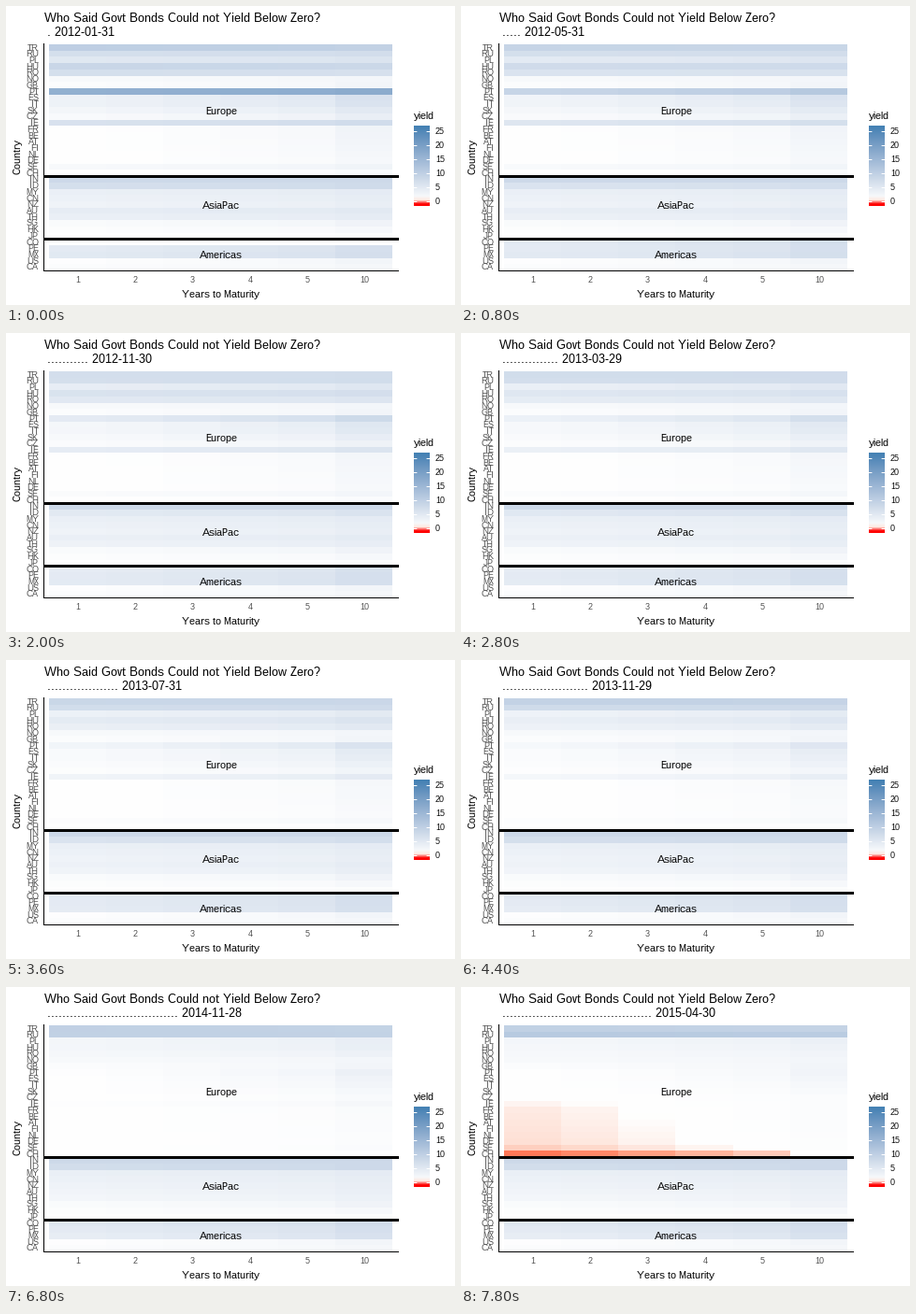
Write a matplotlib script that moves like this. It is 480x320 px and loops after 8000 ms.

```python
import numpy as np
import matplotlib.pyplot as plt
from matplotlib.animation import FuncAnimation

W, H, DPI = 480, 320, 80
MONTHS = 40
PX = 72 / DPI                      # points per pixel
LOW, HIGH = -1.7, 27.0             # limits of the colour scale

plt.rcParams.update({
    "font.family": "Liberation Sans",
    "text.hinting": "native",
    "text.hinting_factor": 1,
    "text.kerning_factor": 6,
})

EUROPE = "TR RU PL HU RO NO GB PT ES IT SK CZ IE FR BE AT FI NL DE SE CH".split()
ASIAPAC = "IN ID MY CN NZ AU TH SG HK JP".split()
AMERICAS = "CO PE MX US CA".split()
NAMES = EUROPE + ASIAPAC + AMERICAS
ROWS = np.arange(len(NAMES))
TENORS = ("1", "2", "3", "4", "5", "10")
TILT = np.array([0, 0.1, 0.25, 0.4, 0.55, 1])

# Final one- and ten-year yields at a few rows; rows between are interpolated
FINAL = {
    "TR": (9.5, 9), "RU": (11, 10.5), "PL": (1.7, 3), "NO": (1.1, 1.7),
    "PT": (0.05, 2.1), "CZ": (0, 0.6), "FR": (-0.18, 0.6), "DE": (-0.27, 0.4),
    "SE": (-0.42, 0.4), "CH": (-1.15, 0.1),
    "IN": (7.7, 7.7), "ID": (6.9, 7.7), "MY": (3.2, 3.9), "TH": (1.7, 2.7),
    "SG": (0.8, 2.3), "JP": (0, 0.4),
    "CO": (4.7, 6.9), "MX": (3.6, 5.9), "US": (0.3, 2), "CA": (0.6, 1.5),
}
# Extra yield at the start, fading towards the end
PREMIUM = {"TR": 1, "RU": -4.5, "PL": 3, "HU": 6.8, "RO": 5.2, "PT": 5,
           "ES": 2.5, "IT": 2.6, "SK": 1.8, "CZ": 1, "IE": 6, "SE": 1.2,
           "AU": 1.7, "TH": 1.4, "MX": 0.9}
DIP = {"TR": 3.5, "ID": 2.6, "CO": 1}     # lull around the first winter
PANIC = {"PT": 11.5}                      # short crisis at the start
CO_START = 4                              # first month with data for CO


def per_row(values):
    return np.array([values.get(name, 0) for name in NAMES])


key_rows = [NAMES.index(name) for name in FINAL]
short_end, long_end = (np.interp(ROWS, key_rows, c) for c in zip(*FINAL.values()))
premium, dip, panic = map(per_row, (PREMIUM, DIP, PANIC))
euro_lift = np.interp(ROWS, [6, 7, 20, 21], [0, 2.4, 0.7, 0])


def yields(month):
    t = month / (MONTHS - 1)
    fade = np.where(premium > 0, (1 - t) ** 1.6, 1 - t ** 3)
    shock = panic * np.exp(-month / 4) - dip * np.exp(-((month - 11) / 8) ** 2)
    below = np.interp(month, [34, 36], [0, 1])
    short = (np.maximum(short_end, 0) + below * np.minimum(short_end, 0)
             + premium * fade + shock)
    long = (long_end + 0.8 * premium * np.where(premium > 0, 1 - t, fade)
            + euro_lift * (1 - t) + 0.8 * shock)
    return short[:, None] + (long - short)[:, None] * TILT


def lab_to_rgb(lab):
    L, a, b = np.moveaxis(lab, -1, 0)
    fy = (L + 16) / 116
    f = np.stack([fy + a / 500, fy, fy - b / 200], -1)
    xyz = np.where(f > 6 / 29, f ** 3, (f - 4 / 29) * 3 * (6 / 29) ** 2)
    xyz = xyz * [0.9505, 1, 1.089]
    m = np.array([[3.2406, -1.5372, -0.4986],
                  [-0.9689, 1.8758, 0.0415],
                  [0.0557, -0.2040, 1.0570]])
    lin = np.clip(xyz @ m.T, 0, 1)
    return np.clip(np.where(lin <= 0.0031308, 12.92 * lin,
                            1.055 * lin ** (1 / 2.4) - 0.055), 0, 1)


def shade(values):
    """Red below zero, white at zero, steel blue at the top, mixed in Lab."""
    stops = ((53.24, 80.09, 67.2), (100, 0, 0), (52.47, -4.07, -32.2))
    lab = [np.interp(values, [LOW, 0, HIGH], c) for c in zip(*stops)]
    return lab_to_rgb(np.stack(lab, -1))


def heat(month):
    grid = shade(yields(month))
    if month < CO_START:
        grid[NAMES.index("CO")] = 1
    return grid


def caption(month):
    """One dot per month, then the month's last working day."""
    first = np.datetime64("2012-02") + month
    day = np.busday_offset(first.astype("datetime64[D]"), -1, roll="forward")
    return "." * (month + 1) + f" {day}"


fig = plt.figure(figsize=(W / DPI, H / DPI), dpi=DPI, facecolor="white")
ax = fig.add_axes([0, 0, 1, 1])


def label(x, y, text, size, ha="left", color="black", **kw):
    return ax.text(x, y, text, fontsize=size * PX, ha=ha, va="baseline",
                   color=color, **kw)


def line(xs, ys, width=1, color="black"):
    ax.plot(xs, ys, color=color, lw=width * PX, solid_capstyle="butt",
            snap=False, zorder=3)


LEFT, RIGHT, TOP, BOTTOM = 40, 420, 40.4, 283.2
ROW = (BOTTOM - TOP) / (len(NAMES) + 0.2)
TILE_X = (46, 413)
COL = (TILE_X[1] - TILE_X[0]) / len(TENORS)
GRAY = "#4d4d4d"


def row_y(i):
    return TOP + (i + 0.6) * ROW


tiles = ax.imshow(heat(0), extent=(*TILE_X, round(row_y(35.5)), round(row_y(-0.5))),
                  aspect="auto", interpolation="nearest")

# Axes and region dividers
line([LEFT + 0.5] * 2, [40, 284])
line([LEFT, RIGHT], [283.5] * 2)
for y in (182.5, 249.5):
    line([LEFT, RIGHT], [y, y], 3)
for i, name in enumerate(NAMES):
    label(35, round(row_y(i) + 3.2), name, 9, "right", GRAY)
for i, tenor in enumerate(TENORS):
    label(46.4 + (i + 0.5) * 61.29, 296, tenor, 9, "center", GRAY)
for text, y in (("Europe", 116), ("AsiaPac", 217), ("Americas", 270)):
    label(230, y, text, 11, "center", zorder=4)
label(229.5, 312, "Years to Maturity", 11, "center")
label(15, 161.5, "Country", 11, "center", rotation=90, rotation_mode="anchor")

# Colour bar
label(436, 121, "yield", 11)
ax.imshow(shade(np.linspace(HIGH, LOW, 20))[:, None], extent=(436, 453, 214, 128),
          aspect="auto", interpolation="bilinear")
for v in range(0, 26, 5):
    y = 214 - (v - LOW) / (HIGH - LOW) * 86
    for x in (436, 449.6):
        line([x, x + 3.4], [round(y) + 0.5] * 2, 1, "white")
    label(459, round(y + 3.2), str(v), 9)

label(41, 17, "Who Said Govt Bonds Could not Yield Below Zero?", 13)
subtitle = label(44, 32, caption(0), 13)

ax.set_xlim(0, W)
ax.set_ylim(H, 0)
ax.axis("off")


def draw(month):
    tiles.set_data(heat(month))
    subtitle.set_text(caption(month))
    return tiles, subtitle


anim = FuncAnimation(fig, draw, frames=MONTHS, interval=200, repeat=True,
                     repeat_delay=0, blit=False)
plt.show()
```
